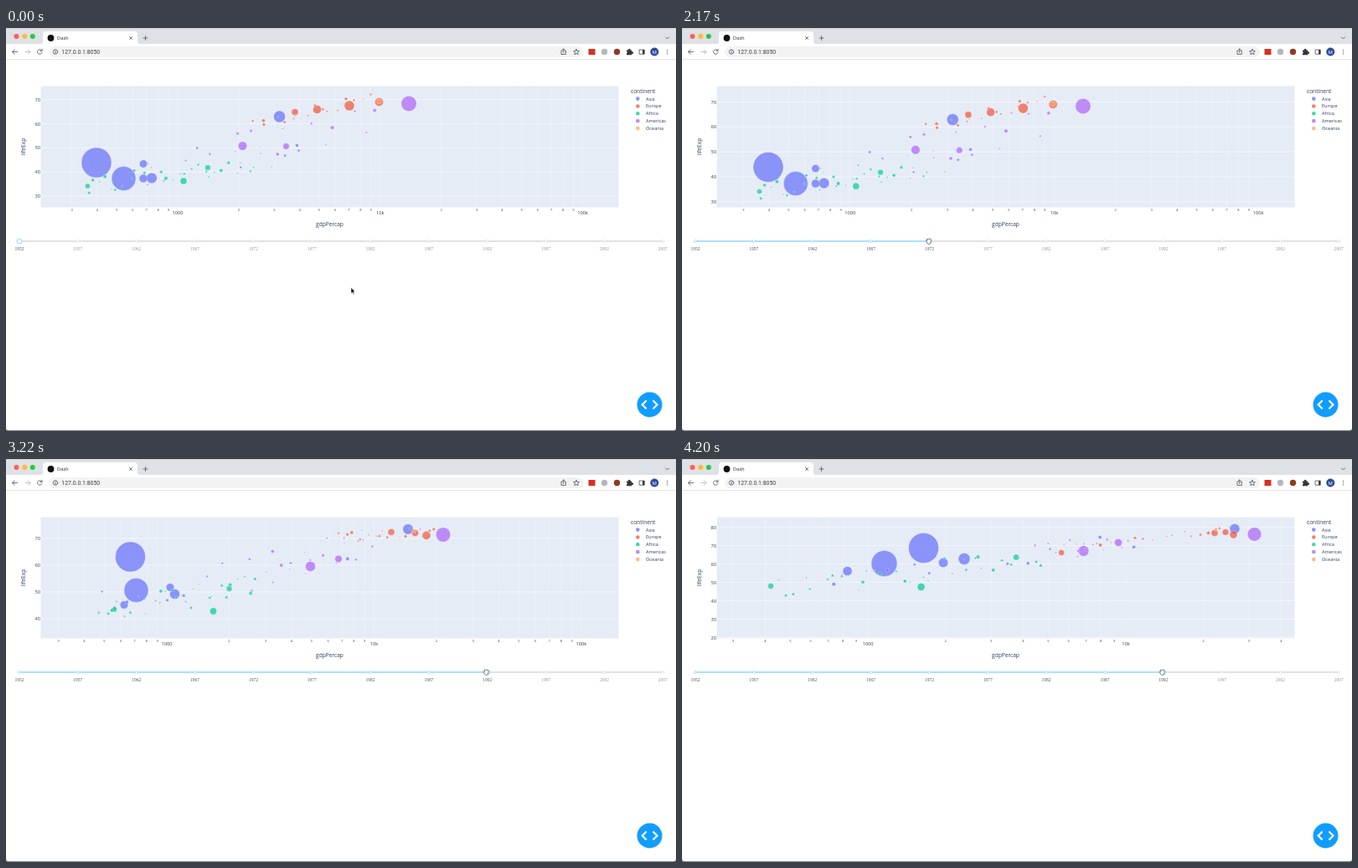
An HTML page that plays this animation: 800x482 px, repeating every 4270 ms.

```html
<!DOCTYPE html>
<html lang="en">
<head>
<meta charset="utf-8">
<title>Dash</title>
<style>
html, body { margin: 0; width: 100%; height: 100%; overflow: hidden; background: #fff; }
svg { display: block; width: 800px; height: 482px; }
text { font-family: "Open Sans", sans-serif; fill: #2a3f5f; }
.mid { text-anchor: middle; }
.years text { font: 5.5px "Liberation Serif", serif; fill: #999; text-anchor: middle; }
.years .on { fill: #555; }
.ui text { font-family: Roboto, sans-serif; fill: #3c4043; }
.line { fill: none; stroke: #5f6368; stroke-width: .9; stroke-linecap: round; stroke-linejoin: round; }
</style>
</head>
<body>
<svg viewBox="0 0 800 482">
  <defs><clipPath id="plot"><rect x="41.5" y="69.5" width="690" height="145"/></clipPath></defs>
  <g class="ui">
    <rect width="800" height="19" fill="#dee1e6"/>
    <rect width="800" height=".7" fill="#cfcbc2"/>
    <circle cx="12.5" cy="10" r="3" fill="#fe5f57"/>
    <circle cx="22.3" cy="10" r="3" fill="#febc2e"/>
    <circle cx="31.8" cy="10" r="3" fill="#28c840"/>
    <path d="M40 19.5q4 0 4-4V8q0-4 4-4h105q4 0 4 4v7.5q0 4 4 4z" fill="#fff"/>
    <circle cx="53.5" cy="12" r="3.9" fill="#111"/>
    <text x="61" y="14.2" font-size="6">Dash</text>
    <path class="line" d="M147.5 10.5l3 3m0-3l-3 3M164 12h5m-2.5-2.5v5M787.500 11l2 2 2-2"/>
    <rect y="19" width="800" height="18.5" fill="#fff"/>
    <rect x="51" y="22" width="639" height="13" rx="6.5" fill="#f1f3f4"/>
    <path d="M0 37.5h800" stroke="#dcdee1" stroke-width=".8"/>
    <path class="line" d="M13.5 28.5h-6m2.7-2.7l-2.7 2.7 2.7 2.7"/>
    <path class="line" style="stroke:#b6b9bd" d="M23 28.5h6m-2.7-2.7l2.7 2.7-2.7 2.7"/>
    <path class="line" d="M42.7 27a2.8 2.8 0 1 0 .3 2.3M43 25.2v2.2h-2.2"/>
    <circle class="line" cx="59" cy="28.5" r="2.7"/>
    <path class="line" d="M59 28.5v1.3m0-2.7v.1"/>
    <text x="66.300" y="30.9" font-size="6.9">127.0.0.1:8050</text>
    <path class="line" d="M664.3 27h-1.3v4.5h5.300V27h-1.3M665.700 29.500v-4.5m-1.3 1.2l1.3-1.3 1.3 1.3"/>
    <path class="line" d="M681 25.3l1 2.2 2.4.2-1.8 1.6.6 2.3-2.2-1.2-2.1 1.2.5-2.3-1.8-1.6 2.4-.2z"/>
    <rect x="695.5" y="25" width="8" height="7" fill="#d93025"/>
    <circle cx="714.5" cy="28.5" r="3.7" fill="#b4b7bb"/>
    <circle cx="729.5" cy="28.5" r="3.7" fill="#8f3a24"/>
    <path d="M741 26.5h2a1.3 1.3 0 1 1 2.4 0h1.8v2a1.3 1.3 0 1 1 0 2.3v1.400h-6.2v-1.700a1.2 1.2 0 0 0 0-2.300z" fill="#33363a"/>
    <rect class="line" x="756.5" y="26" width="5.8" height="5.2"/>
    <path d="M760 26h2.3v5.2H760z" fill="#3c4043"/>
    <circle cx="774.3" cy="28.5" r="5" fill="#2c4a9e"/>
    <text class="mid" x="774.3" y="30.6" font-size="5.8" style="fill:#fff">M</text>
    <path class="line" stroke-dasharray=".1 2.2" style="stroke-width:1.2" d="M789.5 26.3v5"/>
  </g>
  <rect x="41.5" y="69.5" width="690" height="145" fill="#e5ecf6"/>
  <g id="chart"></g>
  <text class="mid" x="386.5" y="236.6" font-size="6.6">gdpPercap</text>
  <text class="mid" transform="translate(23.3 142) rotate(-90)" font-size="6.6">lifeExp</text>
  <g id="legend"><text x="746" y="77.6" font-size="6.6">continent</text></g>
  <g id="slider" class="years"></g>
  <circle cx="768.5" cy="450.5" r="15" fill="#119dff"/>
  <path d="M764.7 445.5l-5 5 5 5M772.500 445.500l5 5-5 5" fill="none" stroke="#fff" stroke-width="2.2"/>
  <path d="M0 481.5h800" stroke="#85878a"/>
  <path d="M0 478v4h4q-4 0-4-4zM800 478v4h-4q4 0 4-4z" fill="#555"/>
  <g id="pointer"></g>
</svg>
<script>
const LOOP = 4270, STEP = 70, GLIDE = 500;
const LEFT = 41.5, WIDTH = 690, BOTTOM = 214.5, HEIGHT = 145, RAIL = 255;
const $ = id => document.getElementById(id);
const colors = { Asia: '#636efa', Europe: '#ef553b', Africa: '#00cc96', Americas: '#ab63fa', Oceania: '#ffa15a' };

let seed = 11;
const random = () => (seed = seed * 16807 % 2147483647) / 2147483647;
const ease = p => p < .5 ? 4 * p ** 3 : 1 - 4 * (1 - p) ** 3;
const clamp = p => Math.min(1, Math.max(0, p));
const mix = (a, b, k) => a + (b - a) * k;

// Small countries strewn along the line from a to b; most of them tiny
function strew(count, a, b, spread) {
  return Array.from({ length: count }, (_, i) => {
    const k = (i + random()) / count;
    return [mix(a[0], b[0], k), mix(a[1], b[1], k) + (random() - .5) * spread, .8 + 1.5 * random() ** 2];
  });
}

// range: log10 start and span of x, start and span of y.
// Bubbles are [x, y, radius] as laid out in that range: the big countries, then the rest.
const years = [{
  range: [2.3237, 2.854, 25.3, 50.3],
  Asia: [[108, 161, 18], [140.5, 180, 14.5], [326.5, 106, 7], [174, 179.5, 6.3], [164, 162.5, 4.7], [164, 180, 5],
    ...strew(11, [170, 165], [365, 145], 55)],
  Europe: [[410, 93, 6], [445.5, 88.5, 5], [371.5, 97.5, 5], [345, 100.5, 4],
    ...strew(18, [290, 117], [450, 80], 12)],
  Africa: [[212, 183, 4], [241, 167, 3.3], [97.5, 189, 3],
    ...strew(28, [92, 186], [300, 166], 24)],
  Americas: [[481, 90.5, 9.2], [282.5, 141, 5.3], [334.5, 141.5, 3.8],
    ...strew(12, [265, 146], [450, 108], 36)],
  Oceania: [[445.5, 88, 2.8]]
}, {
  range: [2.3919, 2.788, 32.7, 45.2],
  Asia: [[148.5, 117, 18], [155.5, 157, 14.5], [480, 84, 6.2], [201.5, 161.5, 6], [196, 153.5, 4.8], [141, 174.5, 4.8],
    ...strew(15, [100, 178], [430, 106], 45)],
  Europe: [[460, 87.5, 4], [502, 91.5, 5], [488.5, 88.5, 4],
    ...strew(20, [394, 95], [515, 85], 12)],
  Africa: [[247.5, 182, 4.2], [266.5, 155, 3.4], [129.5, 180, 3],
    ...strew(27, [110, 185], [300, 151], 28)],
  Americas: [[522, 90.5, 8.7], [363.5, 128.5, 6], [397, 119.5, 4.3],
    ...strew(13, [290, 122], [445, 104], 32)],
  Oceania: [[487, 86, 2.2]]
}, {
  range: [2.414, 2.24, 19.5, 66],
  Asia: [[288.5, 106.5, 18], [241.5, 125, 15.5], [337, 119.5, 7], [312, 124, 5.7], [197.5, 134, 5.6], [660, 83.5, 6],
    ...strew(15, [165, 143], [550, 98], 24)],
  Europe: [[658.5, 90.5, 4.5], [649, 87.5, 3.8], [636, 88.5, 4], [453, 112, 3.5],
    ...strew(18, [465, 105], [655, 84], 7)],
  Africa: [[285.5, 153, 4.6], [106, 152, 3.4], [399, 117.5, 3.6],
    ...strew(28, [105, 157], [435, 116], 28)],
  Americas: [[683.5, 90, 8.3], [479.5, 110, 6.3], [521, 100, 4.6],
    ...strew(12, [420, 108], [535, 98], 16)],
  Oceania: [[637.5, 84, 2]]
}];

// After a click the axes glide, then the points jump to the new year
const clicks = [1750, 3220], glides = [1952, 3378];
const route = [[0, 412, 310.5], [280, 412, 310.5], [880, 243.5, 260.5], [1150, 243.5, 260.5],
  [1650, 294.5, RAIL], [2240, 294.5, RAIL], [2620, 584.5, 282.5], [2800, 584.5, 282.5],
  [3150, 573.3, RAIL], [LOOP, 573.3, RAIL]];

function chart(t) {
  const at = glides.filter(g => t >= g + GLIDE).length;
  const k = at < 2 ? ease(clamp((t - glides[at]) / GLIDE)) : 0;
  const from = years[at].range, to = years[Math.min(2, at + 1)].range;
  const [x0, xs, y0, ys] = from.map((n, i) => mix(n, to[i], k));
  const toX = e => LEFT + (e - x0) / xs * WIDTH;
  const toY = n => BOTTOM - (n - y0) / ys * HEIGHT;
  let columns = '', rows = '', labels = '', dots = '';

  for (let e = 2; e < 6; e++) for (let d = 1; d < 10; d++) {
    const x = toX(e + Math.log10(d)), major = d === 1;
    if (x < LEFT || x > LEFT + WIDTH) continue;
    columns += `M${x} ${BOTTOM}v${-HEIGHT}`;
    const name = major ? (e < 4 ? 10 ** e : 10 ** (e - 3) + 'k') : d;
    labels += `<text class="mid" x="${x}" y="${major ? 223.2 : 219.4}" font-size="${major ? 5.7 : 4}">${name}</text>`;
  }
  for (let n = 20; n <= 90; n += 10) {
    const y = toY(n);
    if (y < BOTTOM - HEIGHT || y > BOTTOM) continue;
    rows += `M${LEFT} ${y}h${WIDTH}`;
    labels += `<text x="41" y="${y + 2.1}" font-size="5.7" text-anchor="end">${n}</text>`;
  }
  for (const group in colors) for (const [px, py, r] of years[at][group]) {
    const x = toX(from[0] + (px - LEFT) / WIDTH * from[1]);
    const y = toY(from[2] + (BOTTOM - py) / HEIGHT * from[3]);
    dots += `<circle cx="${x}" cy="${y}" r="${r}" fill="${colors[group]}"/>`;
  }
  $('chart').innerHTML = `<path d="${columns}" stroke="#fff" stroke-width=".25"/>
    <path d="${rows}" stroke="#fff" stroke-width=".5"/>
    <g clip-path="url(#plot)" fill-opacity=".7" stroke="#fff" stroke-width=".45" stroke-opacity=".7">${dots}</g>${labels}`;
}

function slider(t) {
  const at = 4 * clicks.filter(c => t >= c).length;
  const markX = i => 16 + i * 69.85;
  let marks = '';
  for (let i = 0; i < 12; i++) {
    const on = i <= at;
    marks += `<circle cx="${markX(i)}" cy="${RAIL}" r="1.5" fill="#fff" stroke="${on ? '#96dbfa' : '#dedede'}" stroke-width=".8"/>
      <text x="${markX(i)}" y="265.5" class="${on ? 'on' : ''}">${1952 + 5 * i}</text>`;
  }
  $('slider').innerHTML = `<path d="M16 ${RAIL}H${markX(11)}" stroke="#e2e2e2" stroke-width="2"/>
    <path d="M16 ${RAIL}H${markX(at)}" stroke="#abe2fb" stroke-width="2"/>${marks}
    <circle cx="${markX(at)}" cy="${RAIL}" r="2.9" fill="#fff" stroke="#96dbfa"/>`;
}

const hand = `<path d="M-2.6 .5q-1.2-1.3 0-1.5l.8.5-.3-2q.7-.9 1.2 0 .4-1.1 1.2 0 .8-.8 1.2.2 1-.4 1.2.6v2.2q-.3 2.6-2.4 2.9h-.8q-1.3-.5-2.1-2.9z"
  fill="#fff" stroke="#555" stroke-width=".8"/>`;
const arrow = '<path d="M0 0v6.9l1.6-1.4 1.1 2.5 1.1-.5-1-2.4h2.1z" fill="#111" stroke="#fff" stroke-width=".45"/>';

function pointer(t) {
  const i = route.findIndex(p => p[0] > t), a = route[i - 1], b = route[i];
  const k = ease((t - a[0]) / (b[0] - a[0]));
  const x = mix(a[1], b[1], k), y = mix(a[2], b[2], k);
  $('pointer').innerHTML = `<g transform="translate(${x} ${y})">${y < RAIL + 2 ? hand : arrow}</g>`;
}

Object.keys(colors).forEach((name, i) => {
  const y = 84.6 + i * 8.85;
  $('legend').innerHTML += `<circle cx="754.3" cy="${y}" r="2.3" fill="${colors[name]}" fill-opacity=".75"/>
    <text x="764" y="${y + 2}" font-size="5.6">${name}</text>`;
});

function draw() {
  const t = Math.floor(performance.now() % LOOP / STEP) * STEP;
  chart(t);
  slider(t);
  pointer(t);
  requestAnimationFrame(draw);
}
draw();
</script>
</body>
</html>
```
